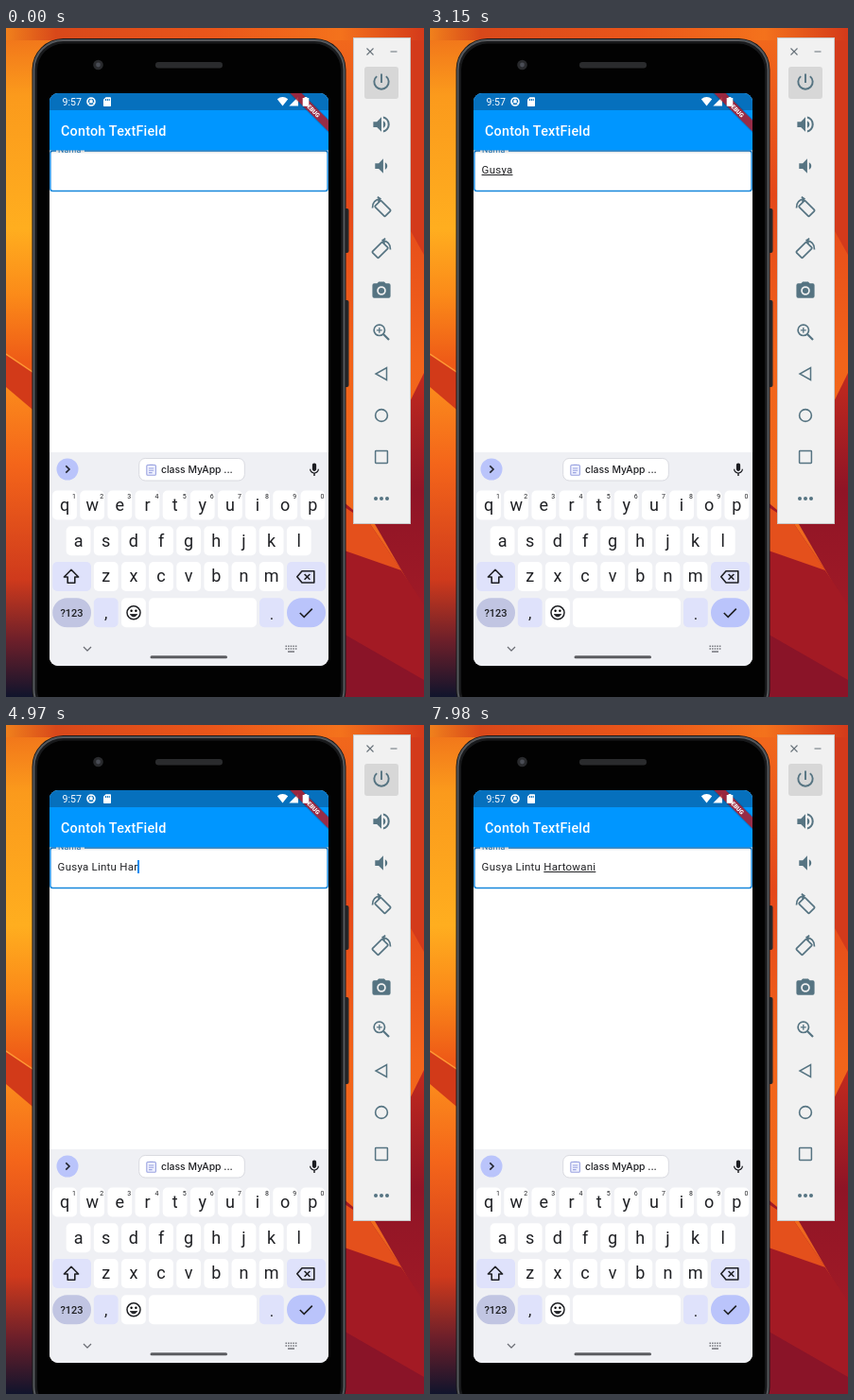
An HTML page that plays this animation: 442x708 px, repeating every 8 s.

```html
<!DOCTYPE html>
<html lang="id">
<head>
<meta charset="utf-8">
<title>Contoh TextField</title>
<style>
html, body { margin: 0; width: 100%; height: 100%; overflow: hidden; background: #d8401c; }
#stage { position: absolute; left: 0; top: 0; width: 442px; height: 708px; overflow: hidden; }
svg { position: absolute; left: 0; top: 0; font-family: Roboto, sans-serif; }
#field {
  position: absolute; left: 54.6px; top: 142px; height: 16px; line-height: 16px;
  font: 11.47px/16px Roboto, sans-serif; letter-spacing: .25px; white-space: pre; color: #202124;
}
#field u { text-decoration-thickness: .8px; text-underline-offset: 1.4px; text-decoration-skip-ink: none; }
#cursor { position: absolute; left: 100%; top: 1px; width: 1.5px; height: 14px; background: #0a8cf0; }
</style>
</head>
<body>
<div id="stage">
<svg width="442" height="708" viewBox="0 0 442 708">
  <defs>
    <linearGradient id="left" x1="0" y1="0" x2="0" y2="1">
      <stop offset="0" stop-color="#f0701a"/><stop offset=".1" stop-color="#fb9a1c"/>
      <stop offset=".3" stop-color="#ffae1f"/><stop offset=".4" stop-color="#fb8a19"/>
      <stop offset=".5" stop-color="#ee5a17"/>
    </linearGradient>
    <linearGradient id="low" x1="0" y1="0" x2="0" y2="1">
      <stop offset="0" stop-color="#fb8a1c"/><stop offset=".25" stop-color="#f4651a"/>
      <stop offset=".62" stop-color="#cf3a1c"/><stop offset=".82" stop-color="#6c1f2a"/>
      <stop offset="1" stop-color="#10142c"/>
    </linearGradient>
    <linearGradient id="right" x1="0" y1="0" x2="0" y2="1">
      <stop offset="0" stop-color="#f26a1c"/><stop offset=".25" stop-color="#e4481a"/>
      <stop offset=".5" stop-color="#f2641a"/><stop offset=".75" stop-color="#f06a1e"/>
      <stop offset="1" stop-color="#b01d22"/>
    </linearGradient>
    <linearGradient id="crimson" x1="0" y1="0" x2="0" y2="1">
      <stop offset="0" stop-color="#c22a1e"/><stop offset=".5" stop-color="#8f1426"/>
      <stop offset="1" stop-color="#a01a26"/>
    </linearGradient>
    <linearGradient id="top" x1="0" y1="0" x2="1" y2="0">
      <stop offset="0" stop-color="#f0801c"/><stop offset=".12" stop-color="#d8481a"/>
      <stop offset=".5" stop-color="#ea561a"/><stop offset=".8" stop-color="#f4721c"/>
      <stop offset="1" stop-color="#d43a1a"/>
    </linearGradient>
    <linearGradient id="shade" x1="0" y1="0" x2="0" y2="1">
      <stop offset="0" stop-color="#000" stop-opacity=".22"/><stop offset="1" stop-color="#000" stop-opacity="0"/>
    </linearGradient>
    <clipPath id="screen"><rect x="46" y="69" width="295" height="606" rx="9"/></clipPath>
    <clipPath id="page"><rect x="46" y="129" width="295" height="320"/></clipPath>
  </defs>

  <!-- wallpaper -->
  <rect width="200" height="708" fill="url(#left)"/>
  <path d="M0 345L40 372V420L0 382Z" fill="#d23a19"/>
  <path d="M0 345L40 372" stroke="#ff9a35" stroke-width="1.5"/>
  <path d="M0 380L40 414V708H0Z" fill="url(#low)"/>
  <rect x="200" width="242" height="708" fill="url(#right)"/>
  <path d="M428 0H442V240L428 215Z" fill="#d33a1b"/>
  <path d="M442 365L415 420L390 525L442 615Z" fill="url(#crimson)"/>
  <path d="M355 500L385 525L442 610V708H355Z" fill="#a31a24"/>
  <path d="M355 505L385 525L418 574L355 552Z" fill="#e4501c"/>
  <path d="M355 640L442 690V708H355Z" fill="#8a1428"/>
  <rect width="442" height="13" fill="url(#top)"/>

  <!-- phone -->
  <rect x="357" y="191" width="5.5" height="47" rx="2" fill="#26272a"/>
  <rect x="357" y="288" width="5.5" height="92" rx="2" fill="#26272a"/>
  <rect x="27.5" y="11" width="332" height="722" rx="33" fill="#18191b"/>
  <rect x="29.5" y="13" width="328" height="718" rx="31" fill="none" stroke="#55585c" stroke-width="2"/>
  <rect x="33" y="16.5" width="321" height="711" rx="28" fill="#020202"/>
  <rect x="158" y="36" width="71" height="6.5" rx="3.2" fill="#2a2b2d"/>
  <circle cx="97.5" cy="39" r="5.3" fill="#292a2d"/><circle cx="97.5" cy="39" r="2.4" fill="#4a4d55"/>

  <g clip-path="url(#screen)">
    <rect x="46" y="69" width="295" height="606" fill="#fff"/>
    <g clip-path="url(#page)">
      <rect x="46.9" y="130" width="293.2" height="42.6" rx="2.5" fill="#fff" stroke="#1787dc" stroke-width="1.5"/>
      <path d="M53 130H83" stroke="#fff" stroke-width="2.4"/>
      <text x="55" y="132.3" font-size="8.8" letter-spacing=".25" fill="#1f78bd">Nama</text>
      <rect x="46" y="129" width="295" height="4" fill="url(#shade)"/>
    </g>
    <rect x="46" y="69" width="295" height="60.4" fill="#0096ff"/>
    <rect x="46" y="69" width="295" height="18" fill="#0670bd"/>
    <text x="58" y="113.6" font-size="14.34" font-weight="500" letter-spacing=".22" fill="#fff">Contoh TextField</text>

    <!-- status icons -->
    <g fill="#fff">
      <text x="59.5" y="82" font-size="10.6">9:57</text>
      <circle cx="90" cy="78" r="4" fill="none" stroke="#fff" stroke-width="1.6"/>
      <path d="M90 74V76.5M86.5 80L89 78.5M93.5 80L91 78.5M88.5 76.8H91.5L90 79.5Z" stroke="#fff"/>
      <path d="M105.5 73.2H110.2Q111 73.2 111 74V82.2Q111 83 110.2 83H103.8Q103 83 103 82.2V75.8Z"/>
      <path d="M105.6 75V77M107.4 75V77M109.2 75V77" stroke="#0670bd"/>
      <path d="M286.8 75.3Q292.5 70.8 298.2 75.3L292.5 82.6Z"/>
      <path d="M309 73V82.6H299.4Z"/>
    </g>
    <g transform="translate(341 69) rotate(45)">
      <rect x="-30" y="19.3" width="60" height="10.4" fill="#000" opacity=".16"/>
      <rect x="-30" y="20.1" width="60" height="8.6" fill="#b01f30" opacity=".86"/>
      <text y="26.7" font-size="6.3" font-weight="900" text-anchor="middle" fill="#fff">DEBUG</text>
    </g>
    <path d="M315.6 73H318.4V74H320.3V82.8H313.7V74H315.6Z" fill="#fff"/>

    <!-- keyboard -->
    <rect x="46" y="449" width="295" height="226" fill="#eff0f4"/>
    <circle cx="65" cy="467" r="11.5" fill="#bac4fb"/>
    <path d="M63.3 463.4L67 467L63.3 470.6" fill="none" stroke="#22252e" stroke-width="1.6"/>
    <rect x="140.7" y="455.5" width="111.6" height="23.5" rx="6.5" fill="#fff" stroke="#d9dae0" stroke-width="1"/>
    <g fill="none" stroke="#9aa3e0" stroke-width="1.1">
      <rect x="148.8" y="462.5" width="9.6" height="10.8" rx="1" fill="#eef0ff"/>
      <path d="M151.6 462.3H155.6M151 466H156.2M151 468.3H156.2M151 470.6H154.6"/>
    </g>
    <text x="164" y="471" font-size="10.4" font-weight="500" fill="#1d1e22" style="font-family:Inter,sans-serif">class MyApp ...</text>
    <g id="keys"></g>
    <g fill="none" stroke="#1f2024" stroke-width="1.6" stroke-linejoin="round">
      <path d="M69 573.3L76.6 581H72.8V587.3H65.2V581H61.4Z"/>
      <path d="M313 574.7H325.8V587H313L307.8 580.8Z"/>
      <path d="M315.6 578L321.4 583.8M321.4 578L315.6 583.8"/>
      <circle cx="135" cy="618.8" r="7" stroke-width="1.5"/>
      <path d="M131.2 620.5Q135 625.5 138.8 620.5Z" fill="#1f2024" stroke-width=".8"/>
      <path d="M310.8 619L315.2 623.4L323.8 614.6" stroke-linejoin="miter"/>
      <path d="M82 655L86 659L90 655" stroke="#6b6d74" stroke-width="1.2"/>
    </g>
    <circle cx="132.6" cy="616.8" r="1.2"/><circle cx="137.4" cy="616.8" r="1.2"/>
    <g stroke="#74767c" stroke-width="1.5">
      <path d="M295.5 654.2H307.5M295.5 657H307.5" stroke-dasharray="1.5 1.1"/>
      <path d="M298 660H305"/>
    </g>
    <rect x="152.5" y="664.3" width="81.5" height="3" rx="1.5" fill="#5b5c60"/>
  </g>

  <!-- side panel -->
  <rect x="367.5" y="10.5" width="60" height="514" fill="#f1f1f1" stroke="#c9c9c9"/>
  <path d="M381.5 21.5L388.5 28.5M388.5 21.5L381.5 28.5M406.5 25H413.5" stroke="#667078" stroke-width="1.1"/>
  <rect x="379" y="41" width="36" height="34" rx="3" fill="#d7d7d7"/>
  <g id="icons" fill="#567482"></g>
  <g fill="none" stroke="#567482" stroke-width="1.7">
    <g id="turn" transform="translate(397 190)">
      <rect x="-4.6" y="-7.6" width="9.2" height="15.2" rx="1" transform="translate(1.4 1) rotate(-45)"/>
      <path d="M-9.5 .5Q-9.8 -7.5 -1.5 -9.3M-4.2 -11.3L-1.2 -9.3L-3.4 -6.2"/>
    </g>
    <use href="#turn" transform="translate(794 44) scale(-1 1)"/>
    <circle cx="394.8" cy="319.8" r="5.7"/>
    <path d="M399 324L405 330" stroke-width="2.2"/>
    <path d="M391.9 319.8H397.7M394.8 316.9V322.7" stroke-width="1.3"/>
    <path d="M402.5 359.5V372.5L391 366Z" stroke-width="1.5"/>
    <circle cx="397" cy="410" r="6.4" stroke-width="1.6"/>
    <rect x="390.6" y="447.6" width="12.8" height="12.8" rx=".6" stroke-width="1.5"/>
  </g>
  <g fill="#567482"><circle cx="391" cy="498" r="2"/><circle cx="397" cy="498" r="2"/><circle cx="403" cy="498" r="2"/></g>
</svg>
<div id="field"><span id="done"></span><u id="comp"></u><i id="cursor"></i></div>
</div>
<script>
const $ = id => document.getElementById(id);

// Keyboard
const PITCH = 29.15, FIRST = 62;
let keys = '';
const box = (x, y, w, fill, r = 5) => {
  keys += `<rect x="${x}" y="${y}" width="${w}" height="31" rx="${r}" fill="${fill}"/>`;
};
const label = (s, x, y, size, extra = '') => {
  keys += `<text x="${x}" y="${y}" font-size="${size}" text-anchor="middle" fill="#1f2024" ${extra}>${s}</text>`;
};
const row = (letters, x0, y, digits) => [...letters].forEach((c, i) => {
  const x = x0 + i * PITCH;
  box(x - 12.9, y, 25.8, '#fff');
  label(c, x, y + 21.2, 18);
  if (digits) label((i + 1) % 10, x + 10, y + 8.3, 7);
});
row('qwertyuiop', FIRST, 489.5, true);
row('asdfghjkl', FIRST + PITCH / 2, 527.3);
row('zxcvbnm', FIRST + PITCH * 1.5, 565);
const PALE = '#dfe2fb';
box(49.2, 565, 40.8, PALE);
box(297, 565, 41, PALE);
box(49.2, 603.3, 40.8, '#c1c5e2', 15.5);
box(92.8, 603.3, 25.8, PALE);
box(122, 603.3, 25.8, '#fff');
box(151, 603.3, 114, '#fff');
box(268, 603.3, 25.8, PALE);
box(297, 603.3, 41, '#bac4fb', 15.5);
label('?123', 69.5, 623, 11, 'font-weight="500"');
label(',', 105.7, 625, 17);
label('.', 281, 625.5, 17);

// Filled icons on a 24-unit grid
const icon = (d, x, y, size, attr = '') =>
  `<path d="${d}" transform="translate(${x} ${y}) scale(${size / 24}) translate(-12 -12)" ${attr}/>`;
keys += icon('M12 14c1.7 0 3-1.3 3-3V5c0-1.7-1.3-3-3-3S9 3.3 9 5v6c0 1.7 1.3 3 3 3zm5.3-3c0 3-2.5 5.1-5.3 5.1S6.7 14 6.7 11H5c0 3.4 2.7 6.2 6 6.7V21h2v-3.3c3.3-.5 6-3.3 6-6.7z',
  326, 467.5, 17, 'fill="#1b1c20"');
$('keys').innerHTML = keys;

$('icons').innerHTML = [
  ['M13 3h-2v10h2zm4.8 2.2l-1.4 1.4A7 7 0 1 1 7.6 6.6L6.2 5.2A9 9 0 1 0 17.8 5.2z', 57],
  ['M3 9v6h4l5 5V4L7 9zm13.5 3c0-1.8-1-3.3-2.5-4v8c1.5-.7 2.5-2.2 2.5-4zM14 3.2v2.1a7 7 0 0 1 0 13.4v2.1a9 9 0 0 0 0-17.6z', 102],
  ['M18.5 12c0-1.8-1-3.3-2.5-4v8c1.5-.7 2.5-2.2 2.5-4zM5 9v6h4l5 5V4L9 9z', 146],
  ['M9 2L7.2 4H4a2 2 0 0 0-2 2v12a2 2 0 0 0 2 2h16a2 2 0 0 0 2-2V6a2 2 0 0 0-2-2h-3.2L15 2zm3 15a5 5 0 1 1 0-10a5 5 0 1 1 0 10zm0-1.8a3.2 3.2 0 1 0 0-6.4a3.2 3.2 0 1 0 0 6.4z', 278]
].map(([d, y]) => icon(d, 397, y, 23)).join('');

// Typing: [time, letters shown, start of the underlined word]
const NAME = 'Gusya Lintu Hartowani', LOOP = 8000, NONE = 99;
const edits = [
  [0, 0, NONE], [1400, 1, 0], [1750, 2, 0], [2100, 3, 0], [2310, 4, 0], [2520, 5, 0],
  [3640, 5, NONE], [3710, 6, NONE],
  [3850, 7, 6], [3990, 8, 6], [4130, 9, 6], [4270, 10, 6], [4410, 11, 6],
  [4550, 12, NONE], [4690, 13, NONE], [4830, 14, NONE], [4970, 15, NONE],
  [5180, 16, NONE], [5460, 17, NONE],
  [5740, 18, 12], [6020, 19, 12], [6160, 20, 12], [6300, 21, 12]
];
const hidden = [[0, 70], [490, 980], [1190, 1400], [3010, 3500], [6790, 7290], [7780, LOOP]];

function draw(t) {
  const [, n, from] = edits.filter(e => e[0] <= t).pop();
  const cut = Math.min(n, from);
  $('done').textContent = NAME.slice(0, cut);
  $('comp').textContent = NAME.slice(cut, n);
  $('cursor').style.opacity = hidden.some(([a, b]) => t >= a && t < b) ? 0 : 1;
}

const start = performance.now();
function tick() {
  draw((performance.now() - start) % LOOP);
  requestAnimationFrame(tick);
}
tick();
</script>
</body>
</html>
```
